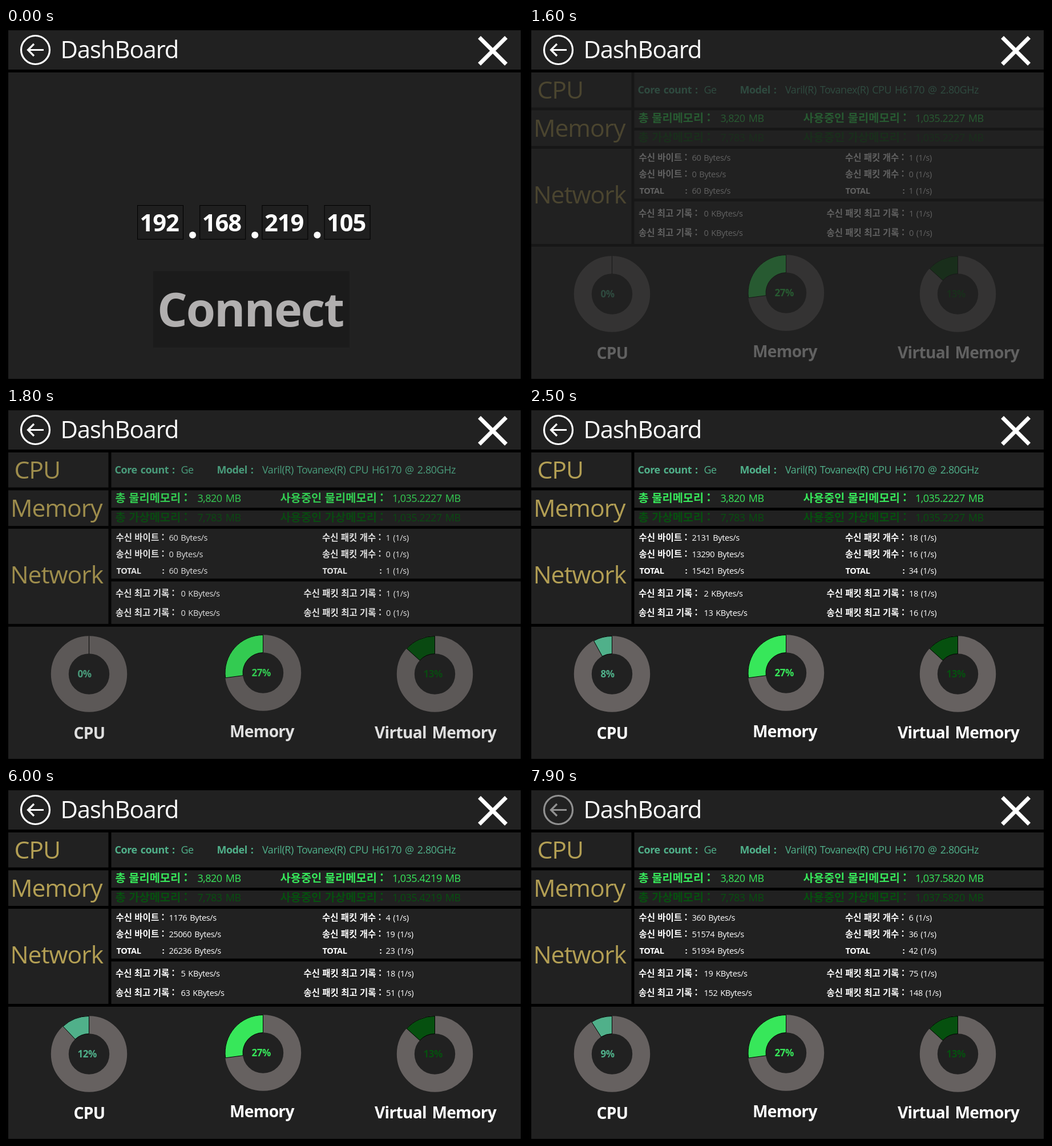
Recreate the animation shown at these times as an HTML page. Size 906 by 618 pixels, loop 8000 ms.

```html
<!DOCTYPE html>
<html lang="ko">
<head>
<meta charset="utf-8">
<title>DashBoard</title>
<style>
  html, body { margin: 0; width: 100%; height: 100%; overflow: hidden; background: #000; }
  svg { display: block; }
  text { font-family: "Open Sans", "Noto Sans", sans-serif; letter-spacing: -.025em; word-spacing: .1em; }
  .ko { font-family: "Noto Sans CJK KR", "Noto Sans CJK", sans-serif; letter-spacing: 0; word-spacing: 0; }
</style>
</head>
<body>
<svg id="stage" width="906" height="618" viewBox="0 0 906 618"></svg>
<script>
const LOOP = 8000, PHYSICAL = 3820, VIRTUAL = 7783;
const PANEL = '#212121', GOLD = '#b39f54', TEAL = '#50b08a', GREEN = '#37e75a', DARK = '#06500f', RING = '#666160';

const ticks = [0, 2500, 3300, 4200, 5100, 6000, 7000, 7900];
const load = [0, 8, 10, 24, 7, 12, 56, 9];

// tick, memory in use, bytes in/out, packets in/out; other ticks lie between these
const keys = [
  [0, 1035.2227, 60, 0, 1, 0],
  [1, 1035.2227, 2131, 13290, 18, 16],
  [3, 1035.3906, 4692, 64735, 14, 51],
  [5, 1035.4219, 1176, 25060, 4, 19],
  [6, 1035.4219, 19456, 155700, 75, 148],
  [7, 1037.5820, 360, 51574, 6, 36],
];

const readings = ticks.map((_, i) => {
  const next = keys.findIndex(key => key[0] >= i);
  const b = keys[next], a = keys[next - 1] || b;
  const f = (i - a[0]) / (b[0] - a[0]) || 0;
  const [, memory, ...traffic] = a.map((v, k) => v + (b[k] - v) * f);
  return { memory, traffic: traffic.map(Math.round) };
});
const peaksUntil = i =>
  [0, 1, 2, 3].map(k => Math.max(...readings.slice(0, i + 1).map(r => r.traffic[k])));

const grouped = (n, digits) =>
  n.toLocaleString('en-US', { minimumFractionDigits: digits, maximumFractionDigits: digits });
const rect = (x1, y1, x2, y2, fill = PANEL, extra = '') =>
  `<rect x="${x1}" y="${y1}" width="${x2 - x1}" height="${y2 - y1}" fill="${fill}" ${extra}/>`;
const text = (s, x, y, size, fill = '#fff', weight = 400) =>
  `<text x="${x}" y="${y}" font-size="${size * .97}" fill="${fill}" font-weight="${weight}">${s}</text>`;
const bold = (s, x, y, size, fill) => text(s, x, y, size, fill, 700);
const korean = (s, x, y, size, fill = '#fff') =>
  `<text class="ko" x="${x}" y="${y}" font-size="${size}" fill="${fill}" font-weight="700">${s} :</text>`;

function donut(cx, cy, percent, color) {
  const angle = percent / 100 * 2 * Math.PI, big = +(percent > 50);
  const point = r => `${cx - r * Math.sin(angle)} ${cy - r * Math.cos(angle)}`;
  return `<circle cx="${cx}" cy="${cy}" r="51.2" fill="none" stroke="${RING}" stroke-width="31"/>
    <path d="M${cx} ${cy - 66.5}A66.5 66.5 0 ${big} 0 ${point(66.5)}L${point(35.5)}A35.5 35.5 0 ${big} 1 ${cx} ${cy - 35.5}Z"
      fill="${color}" stroke="#000"/>` + bold(Math.round(percent) + '%', cx - 20, cy + 6, 17.5, color);
}

function header(t) {
  return rect(4, 4, 902, 73) + text('DashBoard', 95.5, 53, 43) +
    `<g fill="none" stroke="#fff">
      <g opacity="${t < 7300 ? 1 : .5}" stroke-width="3.2">
        <circle cx="51.5" cy="38.5" r="25"/>
        <path d="M66 38.5H39M49 28L38.5 38.5L49 49"/>
      </g>
      <path d="M829.5 16.5L876.5 63.5M876.5 16.5L829.5 63.5" stroke-width="7"/>
    </g>`;
}

function connectPage(t) {
  const hover = t >= 500 && t < 700;
  const boxes = [192, 168, 219, 105].map((part, i) => {
    const x = 230.5 + i * 109.2;
    const border = hover && i === 2 ? '#7eb4ea' : '#000';
    return rect(x, 311.5, x + 80, 371, '#1f1f1f', `stroke="${border}"`) +
      bold(part, x + 4, 357, 43) +
      (i < 3 ? `<circle cx="${x + 96.5}" cy="363.5" r="6" fill="#fff"/>` : '');
  }).join('');
  const button = t < 1200
    ? rect(258, 427, 602, 561, '#1b1b1b')
    : rect(268, 437, 592, 551, '#1b1b1b', 'stroke="#272727" stroke-width="4"');
  const label = t < 1200 ? '#b1afaf' : t < 1500 ? '#544a4a' : '#4a4040';
  return boxes + button + bold('Connect', 265, 524, 85.5, label);
}

function dashboard(t) {
  const now = ticks.filter(start => start <= t).length - 1;
  const { memory, traffic: [inB, outB, inP, outP] } = readings[now];
  const [topInB, topOutB, topInP, topOutP] = peaksUntil(now);

  const memoryRow = (kind, total, y, color) =>
    korean(`총 ${kind}메모리`, 191.5, y, 19.8, color) + text(grouped(total, 0) + ' MB', 335.5, y, 18.5, color) +
    korean(`사용중인 ${kind}메모리`, 480.5, y, 19.8, color) + text(grouped(memory, 4) + ' MB', 677, y, 18.5, color);
  const rate = (bytes, packets, y) =>
    text(bytes + ' Bytes/s', 285.5, y, 15) + text(packets + ' (1/s)', 665.5, y, 15);
  const rateRow = (way, bytes, packets, y) =>
    korean(way + ' 바이트', 192.5, y, 15.5) + korean(way + ' 패킷 개수', 554, y, 15.5) + rate(bytes, packets, y);
  const peakRow = (way, bytes, packets, y) =>
    korean(way + ' 최고 기록', 192, y, 15.5) + text(Math.round(bytes / 1024) + ' KBytes/s', 306.5, y, 15) +
    korean(way + ' 패킷 최고 기록', 521.5, y, 15.5) + text(packets + ' (1/s)', 666, y, 15);
  const totalLabel = (x, colonX) => bold('TOTAL', x, 290.5, 15) + bold(':', colonX, 290.5, 15);

  return `<path d="M0 75.5H906M4 142H902M4 209.5H902M4 381.5H902M182 177.5H902M182 302H902M182 78V381"
      stroke="#000" stroke-width="5"/>` +
    text('CPU', 14.5, 124, 44, GOLD) + text('Memory', 8, 191, 44, GOLD) + text('Network', 7.5, 308, 44, GOLD) +
    bold('Core count :', 190.5, 115, 18.5, TEAL) + text('Ge', 306.5, 115, 18.5, TEAL) +
    bold('Model :', 369.5, 115, 18.5, TEAL) +
    text('Varil(R) Tovanex(R) CPU H6170 @ 2.80GHz', 449, 115, 18.5, TEAL) +
    memoryRow('물리', PHYSICAL, 165, GREEN) + memoryRow('가상', VIRTUAL, 199, DARK) +
    rateRow('수신', inB, inP, 232.5) + rateRow('송신', outB, outP, 262) +
    totalLabel(193.5, 273.5) + totalLabel(554.5, 654.5) + rate(inB + outB, inP + outP, 290.5) +
    peakRow('수신', topInB, topInP, 330.5) + peakRow('송신', topOutB, topOutP, 365) +
    donut(145.5, 467, load[now], TEAL) +
    donut(450.5, 465, memory / PHYSICAL * 100, GREEN) +
    donut(751.5, 467, memory / VIRTUAL * 100, DARK) +
    bold('CPU', 118.5, 581, 29) + bold('Memory', 392, 578, 29) + bold('Virtual Memory', 646, 580, 29);
}

function scene(t) {
  const fade = Math.min(1, (t - 1500) / 350);
  const page = t < 1600 ? connectPage(t) : `<g opacity="${fade}">${dashboard(t)}</g>`;
  return rect(4, 78, 902, 616) + page + header(t);
}

const stage = document.getElementById('stage');
let shown = -1;
function tick() {
  const step = Math.floor(performance.now() % LOOP / 100);
  if (step !== shown) stage.innerHTML = scene((shown = step) * 100);
  requestAnimationFrame(tick);
}
tick();
</script>
</body>
</html>
```
